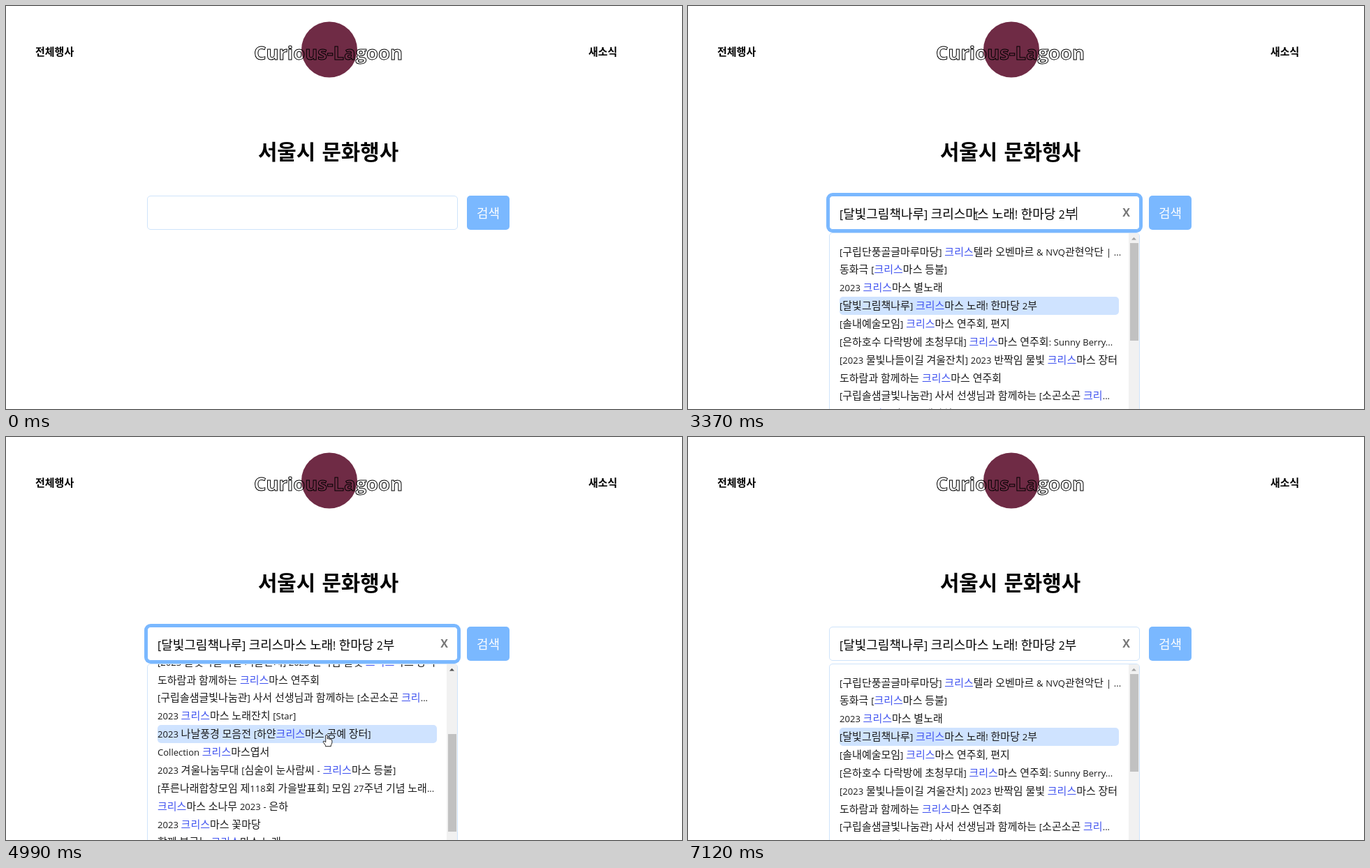
Animation, 968 px wide and 578 px high, one loop 7.19 s. Source, as an HTML page:

```html
<!DOCTYPE html>
<html lang="ko">
<head>
<meta charset="utf-8">
<title>문화행사 검색</title>
<style>
html, body { margin: 0; width: 100%; height: 100%; overflow: hidden; background: #fff; }
body { position: relative; color: #000; font: 15px "Noto Sans CJK KR", "Noto Sans CJK", "Noto Sans KR", sans-serif; }
div, svg { position: absolute; box-sizing: border-box; white-space: pre; }
.latin { font-family: "Open Sans", sans-serif; font-size: .87em; line-height: 0; word-spacing: .35px; }
.nav { top: 54px; line-height: 22px; font-weight: 700; }
h1 { position: absolute; left: 0; top: 187px; width: 923px; margin: 0; text-align: center; font-size: 29.8px; line-height: 40px; font-weight: 700; word-spacing: 1px; }
#logo { left: 343px; top: 15px; }
#logo text { font: 700 27.4px "Open Sans", sans-serif; fill: none; stroke: #000; stroke-width: 1; }
#field { left: 202px; top: 272px; width: 445px; height: 49px; border: 1px solid #cfe4fb; border-radius: 5px; background: #fff; }
#field.focus { border-color: #7ab8ff; box-shadow: 0 0 0 4px #7ab8ff; }
#line { left: 217px; top: 272px; width: 402px; height: 50px; overflow: hidden; display: flex; align-items: center; font-size: 18px; line-height: 26px; }
#line u { text-decoration-thickness: 1px; text-underline-offset: 2px; }
#caret { width: 1px; height: 19px; flex: none; background: #000; }
#clear { left: 617px; top: 284px; width: 21px; text-align: center; font: 700 16px/24px "Open Sans", sans-serif; color: #777; }
#button { left: 660px; top: 272px; width: 61px; height: 49px; border-radius: 5px; background: #7ab8ff; color: #fff; text-align: center; font-size: 18px; line-height: 48px; }
#list { left: 202px; top: 325px; width: 445px; height: 302px; border: 1px solid #cfe4fb; border-radius: 5px; background: #fff; overflow: hidden; }
#rows { left: 14px; top: 13.5px; width: 400px; color: #1b1b1b; }
.row { left: 0; width: 400px; height: 25.87px; line-height: 24.4px; border-radius: 5px; }
.row.on { background: #cfe3ff; }
.row b { color: #4255f0; font-weight: 500; }
#bar { right: 0; top: 0; width: 15px; height: 302px; background: #f1f1f1; }
#thumb { left: 2px; top: 14px; width: 12px; height: 140px; background: #c1c1c1; }
#up { left: 4px; top: 5px; }
#cursor { left: 0; top: 0; width: 1px; height: 1px; overflow: visible; }
#cursor path { stroke: #222; stroke-width: 1; fill: #fff; stroke-linejoin: round; }
</style>
</head>
<body>
<div class="nav" style="left:42px">전체행사</div>
<div class="nav" style="left:834px">새소식</div>
<svg id="logo" width="240" height="95">
  <circle cx="120" cy="47.5" r="40" fill="#6f2b45"/>
  <text x="118.5" y="62" text-anchor="middle">Curious-Lagoon</text>
</svg>
<h1>서울시 문화행사</h1>
<div id="list">
  <div id="rows"></div>
  <div id="bar">
    <svg id="up" width="7" height="5"><path d="M0 4.5L3.5 .8 7 4.5Z"/></svg>
    <div id="thumb"></div>
  </div>
</div>
<div id="field"></div>
<div id="line"><span id="typed"></span><span id="caret"></span></div>
<div id="clear">X</div>
<div id="button">검색</div>
<svg id="cursor">
  <path id="arrow" d="M0 0V11.5L2.7 9 4.5 13 6.2 12.2 4.5 8.4H8.2Z"/>
  <path id="hand" d="M-1.3 1.2Q0 -.6 1.3 1.2V6.2Q2.6 5.2 3.6 6.6 5 5.8 5.8 7.2 7.6 6.8 7.8 8.6V11.5Q7.5 14 6.2 15.2V17H-1.6V15.5L-5 10.5Q-4.5 8.6 -2.8 9.8L-1.3 11Z"/>
  <path id="beam" style="fill:none" d="M-2.5 -5.5H2.5M0 -5.5V5.5M-2.5 5.5H2.5"/>
</svg>
<script>
const LOOP = 7190, FOCUS = 580, OPEN = 2300, BLUR = 7120, BLINK = 525;
const PITCH = 25.87, TOP = 339.5, LEFT = 217, BOTTOM = 239;
const RISE = 5320, SETTLED = 5540;
const $ = id => document.getElementById(id);

const titles = [
  '[구립단풍골글마루마당] 크리스텔라 오벤마르 & NVQ관현악단 | ...',
  '동화극 [크리스마스 등불]',
  '2023 크리스마스 별노래',
  '[달빛그림책나루] 크리스마스 노래! 한마당 2부',
  '[솔내예술모임] 크리스마스 연주회, 편지',
  '[은하호수 다락방에 초청무대] 크리스마스 연주회: Sunny Berry...',
  '[2023 물빛나들이길 겨울잔치] 2023 반짝임 물빛 크리스마스 장터',
  '도하람과 함께하는 크리스마스 연주회',
  '[구립솔샘글빛나눔관] 사서 선생님과 함께하는 [소곤소곤 크리...',
  '2023 크리스마스 노래잔치 [Star]',
  '2023 나날풍경 모음전 [하얀크리스마스 공예 장터]',
  'Collection 크리스마스엽서',
  '2023 겨울나눔무대 [심술이 눈사람씨 - 크리스마스 등불]',
  '[푸른나래합창모임 제118회 가을발표회] 모임 27주년 기념 노래...',
  '크리스마스 소나무 2023 - 은하',
  '2023 크리스마스 꽃마당',
  '함께 부르는 크리스마스 노래',
  '동화극 [크리스마스 눈길]',
  '2023 크리스마스 나눔터'
];

const markup = s => s.replace(/[ -~]+/g, run =>
  '<span class="latin">' + run.replace(/&/g, '&amp;') + '</span>');
const highlight = s => s.split(/(크리스|크리(?=\.))/)
  .map((part, i) => i % 2 ? '<b>' + part + '</b>' : markup(part)).join('');

const rows = titles.map((title, i) => {
  const row = document.createElement('div');
  row.className = 'row';
  row.style.top = i * PITCH + 'px';
  row.innerHTML = '<span>' + highlight(title) + '</span>';
  $('rows').append(row);
  return row;
});
const widths = rows.map(row => row.firstChild.offsetWidth);

// evenly spaced key presses, each leaving a text in the field
const press = (start, gap, texts) => texts.map((text, i) => ({ time: start + gap * i, text }));
const keys = [
  ...press(0, FOCUS, ['', '']),
  ...press(1240, 130, ['ㅋ', '크', '클', '크리']),
  ...press(1830, 70, ['크릿', '크리스']),
  ...press(2910, 115, ['크리스', ...titles.slice(0, 4)])
];

// mouse moves: start, end, x, y
const moves = [
  [70, 360, 394, 285], [570, 710, 413, 301], [3850, 4450, 446, 404], [4650, 5250, 469, 444],
  [5740, 6090, 530, 420], [6090, 6430, 725, 481], [6500, 6850, 912, 554]
];

const ramp = (t, a, b) => Math.min(1, Math.max(0, (t - a) / (b - a)));
const show = (el, on) => { el.style.visibility = on ? 'visible' : 'hidden'; };

function mouse(t) {
  let x = 551, y = 424;
  for (const [a, b, toX, toY] of moves) {
    const p = ramp(t, a, b);
    x += (toX - x) * p;
    y += (toY - y) * p;
  }
  return { x, y };
}

// three wheel notches down, then one sweep back to the top
function scrollAt(t) {
  let notches = 0;
  for (let i = 0; i < 3; i++) notches += ramp(t, 4450 + 250 * i, 4577 + 250 * i);
  return BOTTOM * (notches / 3 - ramp(t, RISE, RISE + 205));
}

function hoveredRow(t) {
  const { x, y } = mouse(t);
  if (t < OPEN || y < TOP || x < LEFT || x > LEFT + 400) return -1;
  return Math.floor((y + scrollAt(t) - TOP) / PITCH);
}

let lastText;
function type(text) {
  if (text === lastText) return;
  lastText = text;
  $('typed').innerHTML = text && !titles.includes(text)
    ? text.slice(0, -1) + '<u>' + text.slice(-1) + '</u>'
    : markup(text);
}

function draw(t) {
  const { time, text } = keys.filter(k => k.time <= t).pop();
  const focused = t >= FOCUS && t < BLUR;
  type(text);
  $('field').className = focused ? 'focus' : '';
  show($('caret'), focused && Math.floor((t - time) / BLINK) % 2 === 0);
  show($('clear'), text);
  show($('list'), t >= OPEN);

  const scroll = scrollAt(t);
  $('rows').style.transform = `translateY(${-scroll}px)`;
  $('thumb').style.transform = `translateY(${scroll * .465}px)`;
  $('up').style.fill = scroll > 0 ? '#505050' : '#a3a3a3';

  // hover lags behind while the list sweeps back up
  const hover = hoveredRow(t > RISE && t < SETTLED ? RISE : t);
  const active = titles.indexOf(text);
  rows.forEach((row, i) => row.classList.toggle('on', i === active || i === hover));

  const { x, y } = mouse(t);
  const inField = x > 203 && x < 646 && y > 272 && y < 321;
  const shape = inField ? 'beam' : x < LEFT + widths[hover] ? 'hand' : 'arrow';
  const visible = t >= 70 && t < 6920;
  for (const id of ['arrow', 'hand', 'beam']) show($(id), visible && id === shape);
  $('cursor').style.transform = `translate(${x}px, ${y}px)`;
}

const start = performance.now();
function tick() {
  draw((performance.now() - start) % LOOP);
  requestAnimationFrame(tick);
}
tick();
</script>
</body>
</html>
```
